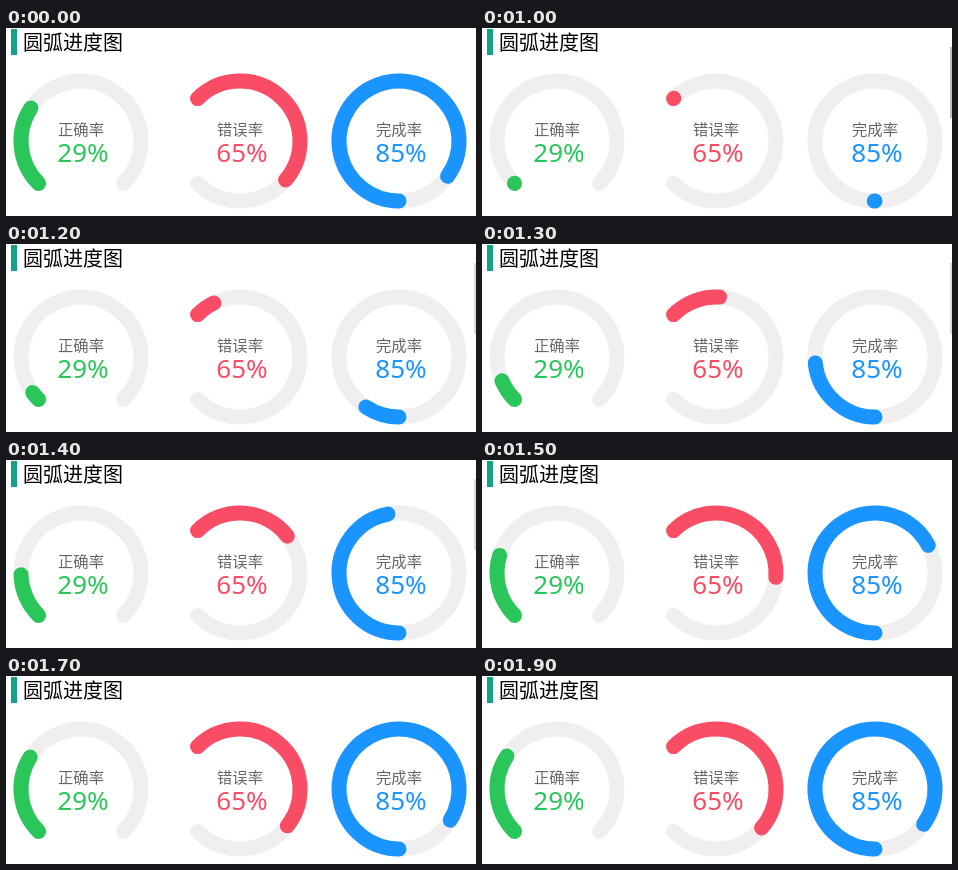
Write an HTML page that moves like this. It is 470 px wide and 188 px high and loops after 2900 ms.

```html
<!DOCTYPE html>
<html lang="zh-CN">
<head>
<meta charset="utf-8">
<title>圆弧进度图</title>
<style>
  html, body { margin: 0; width: 100%; height: 100%; overflow: hidden; background: #fff; }
  svg { display: block; width: 470px; height: 188px; }
  text { font-family: "Noto Sans CJK SC", "Noto Sans CJK", sans-serif; }
  .title { font-size: 20px; fill: #000; }
  .label { font-size: 15.3px; fill: #666; text-anchor: middle; }
  .value { font: 26px "Noto Sans", "Open Sans", sans-serif; text-anchor: middle; }
  path { fill: none; stroke-width: 15; stroke-linecap: round; }
  .track { stroke: #efefef; }
  #scrollbar { fill: #bdbdbd; animation: fade 2900ms step-end infinite; }
  @keyframes fade {
    0% { opacity: 0; }
    34.4828% { opacity: 1; }
    41.3793% { opacity: .55; }
    51.7241%, 100% { opacity: 0; }
  }
</style>
</head>
<body>
<svg id="stage" viewBox="0 0 470 188">
  <rect x="5" y="1" width="6" height="26" fill="#11a38b"/>
  <text class="title" x="17" y="22.4">圆弧进度图</text>
  <rect id="scrollbar" x="468" y="19" width="2" height="71"/>
</svg>
<script>
  const LOOP = 2900, STEP = 100, REPLAY = 1000, EASE_START = 922, EASE_TIME = 922;
  const RADIUS = 60, CY = 113;
  const stage = document.getElementById('stage');

  // Angles in degrees, clockwise from the right.
  const gauges = [
    { cx: 75, start: 135, sweep: 270, percent: 29, color: '#2ac65a', label: '正确率' },
    { cx: 234, start: 225, sweep: 270, percent: 65, color: '#f94c65', label: '错误率' },
    { cx: 393, start: 90, sweep: 360, percent: 85, color: '#1a94ff', label: '完成率' }
  ];

  function add(tag, attrs, content = '') {
    const node = document.createElementNS('http://www.w3.org/2000/svg', tag);
    for (const key in attrs) node.setAttribute(key, attrs[key]);
    node.textContent = content;
    return stage.appendChild(node);
  }

  function arc(cx, start, sweep) {
    const point = angle => {
      const a = angle * Math.PI / 180;
      return `${(cx + RADIUS * Math.cos(a)).toFixed(3)} ${(CY + RADIUS * Math.sin(a)).toFixed(3)}`;
    };
    const half = `A${RADIUS} ${RADIUS} 0 0 1 `;
    return `M${point(start)}${half}${point(start + sweep / 2)}${half}${point(start + sweep)}`;
  }

  for (const g of gauges) {
    add('path', { class: 'track', d: arc(g.cx, g.start, g.sweep) });
    g.bar = add('path', { stroke: g.color });
    add('text', { class: 'label', x: g.cx, y: 107.2 }, g.label);
    add('text', { class: 'value', x: g.cx + 2, y: 134, fill: g.color }, g.percent + '%');
  }

  const cubicInOut = x => x < 0.5 ? 4 * x ** 3 : 1 - 4 * (1 - x) ** 3;

  function progress(time) {
    if (time < REPLAY) return 1;
    const held = Math.floor(time / STEP) * STEP;
    return cubicInOut(Math.min(1, (held - EASE_START) / EASE_TIME));
  }

  function draw(now) {
    const p = progress(now % LOOP);
    for (const g of gauges) {
      g.bar.setAttribute('d', arc(g.cx, g.start, g.sweep * g.percent / 100 * p));
    }
  }

  const origin = performance.now();
  function tick() {
    draw(performance.now() - origin);
    requestAnimationFrame(tick);
  }
  tick();
</script>
</body>
</html>
```
